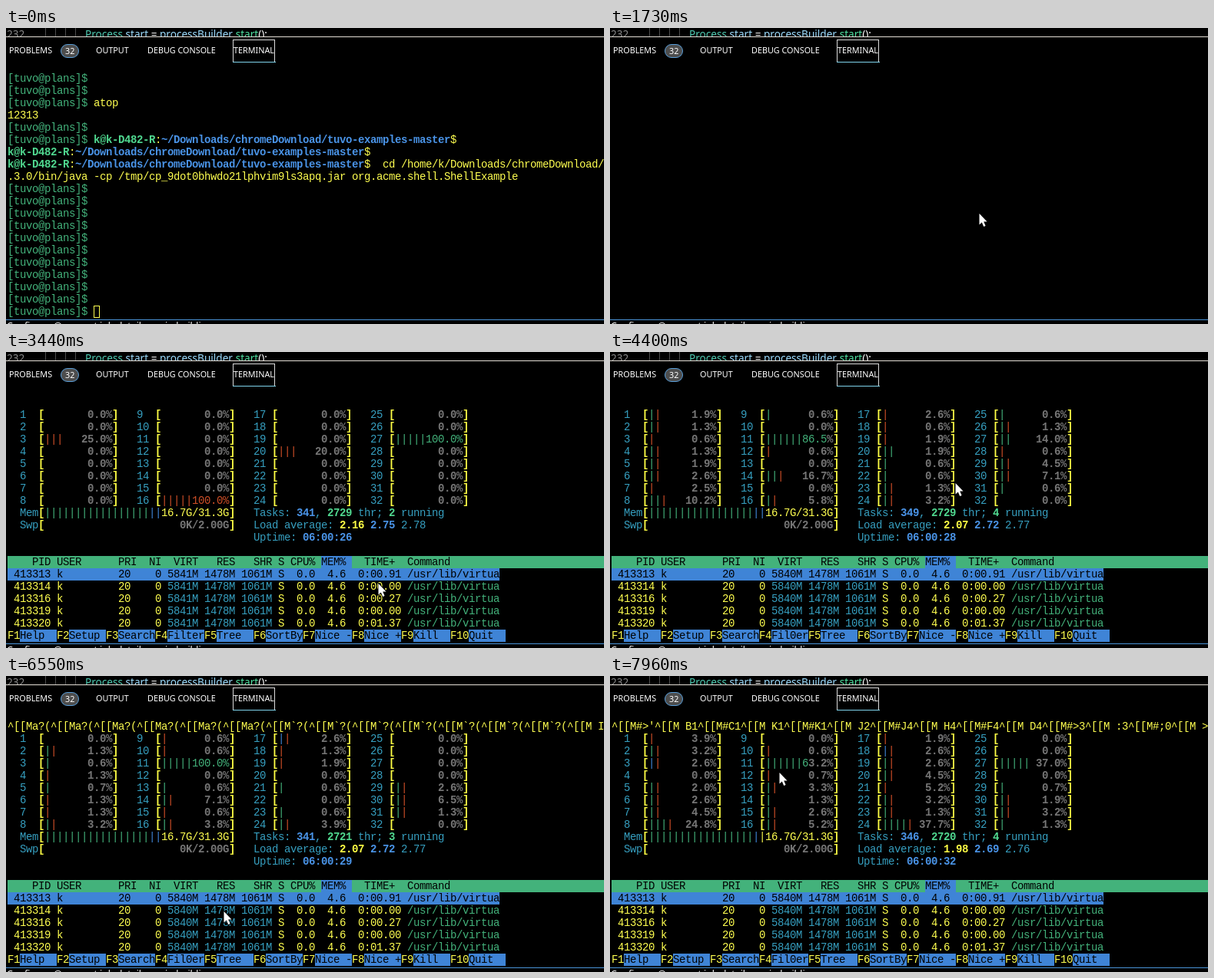
Animation, 778 px wide and 386 px high, one loop 8 s. Source, as an HTML page with a canvas:

```html
<!DOCTYPE html>
<html lang="en">
<head>
<meta charset="utf-8">
<title>Terminal session</title>
<style>
html, body { margin: 0; width: 100%; height: 100%; overflow: hidden; background: #000; }
canvas { display: block; }
</style>
</head>
<body>
<canvas id="stage" width="778" height="386"></canvas>
<script>
const LOOP = 8000, COLS = 97, CELL_W = 8, CELL_H = 16, LEFT = 2, TOP = 58;
const ctx = document.getElementById('stage').getContext('2d');
const MONO = '14px "Liberation Mono", monospace';
const UI = '"Noto Sans", sans-serif';

// Lower case is regular, upper case is bold.
const INK = {
  y: '#ffff50', Y: '#ffff45', g: '#43b27b', G: '#50d990',
  b: '#3f84d6', B: '#4a94e8', c: '#369fc0', r: '#cf4f27',
  K: '#767676', k: '#000'
};

const cellX = col => LEFT + col * CELL_W;
const cellY = row => TOP + row * CELL_H;

function fill(color, x, y, w, h) {
  ctx.fillStyle = color;
  ctx.fillRect(x, y, w, h);
}

function print(col, row, text, style = 'y', bg) {
  if (bg) fill(INK[bg], cellX(col), cellY(row), text.length * CELL_W, CELL_H);
  ctx.font = (style < 'a' ? 'bold ' : '') + MONO;
  ctx.fillStyle = INK[style];
  for (const ch of text) {
    if (ch !== ' ') ctx.fillText(ch, cellX(col), cellY(row) + 12);
    col++;
  }
  return col;
}

// Alternating text and style arguments, printed one after another.
function spans(col, row, ...parts) {
  for (let i = 0; i < parts.length; i += 2) col = print(col, row, parts[i], parts[i + 1]);
  return col;
}

function label(text, x, y, size, color = '#fff') {
  ctx.font = size + 'px ' + UI;
  ctx.fillStyle = color;
  ctx.fillText(text, x, y);
  return x + ctx.measureText(text).width;
}

// ---- Editor frame ----

function drawFrame() {
  ctx.save();
  ctx.beginPath();
  ctx.rect(0, 0, 778, 11);
  ctx.clip();
  label('232', 1, 12.5, 13.6, '#8a8a8a');
  for (let x = 51; x <= 90; x += 13) fill('#4c4c4c', x, 0, 1, 11);
  const code = [['Process', '#4ec9b0'], [' start', '#9cdcfe'], [' = ', '#fff'],
    ['processBuilder', '#9cdcfe'], ['.', '#fff'], ['start', '#4ee0a0'], ['();', '#fff']];
  let x = 103;
  for (const [text, color] of code) x = label(text, x, 12.5, 13.6, color);
  ctx.restore();

  fill('#e4ded6', 0, 11, 778, 1);
  label('PROBLEMS', 4, 33, 10.8);
  label('OUTPUT', 117, 33, 10.8);
  label('DEBUG CONSOLE', 184, 33, 10.8);
  label('TERMINAL', 296, 33, 10.8);

  ctx.beginPath();
  ctx.roundRect(71.5, 21.5, 23, 17, 8.5);
  ctx.fillStyle = '#4d4d4d';
  ctx.fill();
  ctx.lineWidth = 1;
  ctx.strokeStyle = '#5aa0dc';
  ctx.stroke();
  label('32', 77, 34, 10.8);

  ctx.strokeStyle = '#dcdcdc';
  ctx.strokeRect(295.5, 15.5, 54, 29);
  fill('#7fd4ec', 295, 44, 56, 1);

  fill('#4a94d8', 0, 380, 778, 1);
  label('Configure @ current job details, main building', 1, 393, 12.4);
}

// ---- Shell ----

const PROMPT = '[tuvo@plans]$ ';
const KEYS = [[780, 'h'], [1150, 't'], [1230, 'o'], [1310, 'p']];

function hostPrompt(col, row) {
  return spans(col, row, 'k@k-D482-R', 'G', ':', 'y',
    '~/Downloads/chromeDownload/tuvo-examples-master', 'B', '$', 'y');
}

function drawShell(t) {
  const shift = t >= 1690 ? 1 : 0;
  for (let line = shift; line < 20; line++) {
    const row = line - shift;
    if (line === 3) print(0, row, '12313');
    else if (line === 6) hostPrompt(0, row);
    else if (line === 7) print(hostPrompt(0, row), row, '  cd /home/k/Downloads/chromeDownload/');
    else if (line === 8) print(0, row, '.3.0/bin/java -cp /tmp/cp_9dot0bhwdo21lphvim9ls3apq.jar org.acme.shell.ShellExample');
    else {
      const col = print(0, row, PROMPT, 'g');
      if (line === 2) print(col, row, 'atop');
      if (line === 5) hostPrompt(col, row);
    }
  }
  const typed = KEYS.filter(k => t >= k[0]).map(k => k[1]).join('');
  const end = print(PROMPT.length, 19 - shift, typed);
  const x = cellX(shift ? 0 : end), y = cellY(19);
  if (t >= 650) fill(INK.y, x, y, CELL_W, CELL_H);
  else {
    ctx.strokeStyle = INK.y;
    ctx.strokeRect(x + .5, y + .5, CELL_W - 1, CELL_H - 1);
  }
}

// ---- Process monitor ----

// One word per core: load in percent, then bar colours (G, R: filled by load).
const cores = text => text.split(' ');
const SAMPLES = [
  { t: 2020, tasks: 341, threads: 2729, running: 2, load: ['2.16', '2.75', '2.78'], sec: 26, virt: '5841M',
    cores: cores('0 0 25rrr 0 0 0 0 0 0 0 0 0 0 0 0 100R 0 0 0 20rrr 0 0 0 0 0 0 100G 0 0 0 0 0') },
  { t: 3480, tasks: 349, threads: 2729, running: 4, load: ['2.07', '2.72', '2.77'], sec: 28,
    cores: cores('1.9gr 1.3gr .6r 1.3gr 1.9gr 2.6gr 2.5r 10.2ggr .6g 0 86.5G .6r 0 16.7ggr 0 5.8gr ' +
      '2.6r .6r 1.9r 1.9gg .6g .6g 1.3gr 3.2gr .6g 1.3gr 14gg .6r 4.5gr 7.1gr .6g 0') },
  { t: 4980, tasks: 341, threads: 2721, running: 3, load: ['2.07', '2.72', '2.77'], sec: 29,
    cores: cores('0 1.3gr .6g 1.3r .7g 1.3r 1.3r 3.2gr .6r .6r 100G 0 .6g 7.1gr .6r 3.8gr ' +
      '2.6br 1.3r 1.9r 0 .6g 0 .6g 3.9gr 0 0 0 0 2.6gr 6.5gr 1.3gr 0') },
  { t: 7960, tasks: 346, threads: 2720, running: 4, load: ['1.98', '2.69', '2.76'], sec: 32, mem: 'y',
    cores: cores('3.9r 3.2gr 2.6br 0 2.0gr 2.6gr 4.5gr 24.8gggr 0 .6r 63.2G .7r 3.3gr 1.3g 2.6gr 5.2gr ' +
      '1.9r 2.6br 2.6gr 4.5gr 5.2r 3.2gr 1.3gr 37.7ggggr 0 0 37ggggg 0 .7g 1.9gr 3.2gr 1.3g') }
];
// An in-between reading shares half its cores with each neighbour.
const [, , before, after] = SAMPLES;
SAMPLES.splice(3, 0, { ...after, t: 6590, sec: 31, running: 3, mem: 'b',
  cores: after.cores.map((c, i) => i % 2 ? c : before.cores[i]) });

function meter(col, row, bars, text, width) {
  print(col, row, '[', 'Y');
  const body = text.padStart(width);
  for (let i = 0; i < width; i++) {
    const ch = i < bars.length && body[i] === ' ' ? '|' : body[i];
    print(col + 1 + i, row, ch, bars[i] || 'K');
  }
  print(col + 1 + width, row, ']', 'Y');
}

function drawCores(list) {
  const columns = [2, 21, 40, 59];
  list.forEach((word, i) => {
    const load = parseFloat(word);
    let bars = word.replace(/[\d.]+/, '');
    if (/[GR]/.test(bars)) bars = bars.toLowerCase().repeat(Math.round(load * 11 / 100));
    const col = columns[i >> 3], row = 1 + i % 8;
    print(col, row, String(i + 1), 'c');
    meter(col + 3, row, bars, load.toFixed(1) + '%', 11);
  });
}

function drawSummary(s) {
  print(2, 9, 'Mem', 'c');
  meter(5, 9, 'g'.repeat(17) + 'b' + (s.mem || 'b') + 'y'.repeat(11), '16.7G/31.3G', 30);
  print(2, 10, 'Swp', 'c');
  meter(5, 10, '', '0K/2.00G', 30);
  spans(40, 9, 'Tasks: ', 'c', String(s.tasks), 'B', ', ', 'c', String(s.threads), 'G',
    ' thr; ', 'c', String(s.running), 'G', ' running', 'c');
  spans(40, 10, 'Load average: ', 'c', s.load[0] + ' ', 'Y', s.load[1] + ' ', 'B', s.load[2], 'c');
  spans(40, 11, 'Uptime: ', 'c', '06:00:' + s.sec, 'B');
}

const PROCESSES = [['413313', '0:00.91'], ['413314', '0:00.00'], ['413316', '0:00.27'],
  ['413319', '0:00.00'], ['413320', '0:01.37']];

function drawProcesses(virt) {
  print(0, 13, '    PID USER      PRI  NI  VIRT   RES   SHR S CPU% MEM%   TIME+  Command'.padEnd(COLS), 'k', 'g');
  print(51, 13, 'MEM% ', 'k', 'b');
  PROCESSES.forEach(([pid, time], i) => {
    const row = 14 + i, on = i === 0;
    if (on) fill(INK.b, LEFT, cellY(row), 640, CELL_H);
    const put = (col, text, style) => print(col, row, text, on ? 'k' : style);
    put(1, pid + ' k         20    0');
    put(26, virt + ' 1478M 1061M', 'c');
    put(44, 'S  0.0  4.6  ' + time);
    put(65, '/usr/lib/virtua', 'g');
  });
}

function drawKeys(stray) {
  const names = ['Help', 'Setup', 'Search', stray ? 'Fil0er' : 'Filter', 'Tree', 'SortBy',
    'Nice -', 'Nice +', 'Kill', 'Quit'];
  let col = 0;
  names.forEach((name, i) => {
    col = print(col, 19, 'F' + (i + 1));
    col = print(col, 19, name.padEnd(6), 'k', 'b');
  });
}

// ---- Mouse reports echoed on the first line ----

const SLOTS = 14;
const CODES = '?('.repeat(13) + 'I/' +
  'D0C2?494526.7*:(=(?)B,D.E0B*' +
  ">'B1C1K1K1J2J4H4F4D4>3:3;0>(";

function reportTime(i) {
  if (i < 13) return 5720 + i * 36;
  if (i === 13) return 6460;
  return i < 28 ? 6600 + (i - 14) * 41 : 7190 + (i - 28) * 57;
}

const reports = [];
for (let i = 0; i < CODES.length / 2; i++) {
  const code = CODES.substr(i * 2, 2);
  const button = i < 6 ? 'a' : i < 13 ? '`' : i % 2 ? ' ' : '#';
  reports.push({
    t: reportTime(i),
    text: '^[[M' + button + code,
    x: cellX(code.charCodeAt(0) - 33) + 4,
    y: cellY(code.charCodeAt(1) - 33) + 8
  });
}

function drawReports(t) {
  const line = [];
  reports.forEach((r, i) => { if (t >= r.t) line[i % SLOTS] = r.text; });
  print(0, 0, line.join('').slice(0, COLS));
}

// ---- Pointer ----

const TRACK = [
  [230, 650, 206], [450, 570, 226], [700, 480, 242], [2360, 480, 242], [2520, 463, 122],
  [2720, 463, 122], [2960, 420, 230], [3200, 455, 310], [3520, 493, 300], [3560, 494, 295],
  [4160, 494, 295], [4400, 449, 171], [5490, 449, 171],
  ...reports.map(r => [r.t, r.x, r.y]),
  [6240, 258, 257], [6350, 300, 275], [6550, 283, 307], [7960, 220, 126]
].sort((a, b) => a[0] - b[0]);

function drawPointer(t) {
  if (t < TRACK[0][0]) return;
  const next = TRACK.findIndex(k => k[0] > t);
  const b = TRACK[next < 0 ? TRACK.length - 1 : next];
  const a = next < 0 ? b : TRACK[next - 1];
  const p = a === b ? 0 : (t - a[0]) / (b[0] - a[0]);
  ctx.save();
  ctx.translate(Math.round(a[1] + (b[1] - a[1]) * p), Math.round(a[2] + (b[2] - a[2]) * p));
  const shape = new Path2D('M.5 0V14.5L3.8 11.5L6.2 17L8.6 16L6.2 10.6H10.5Z');
  ctx.lineWidth = 1.5;
  ctx.strokeStyle = '#000';
  ctx.stroke(shape);
  ctx.fillStyle = '#fff';
  ctx.fill(shape);
  ctx.restore();
}

function draw(t) {
  fill('#000', 0, 0, 778, 386);
  ctx.lineWidth = 1;
  drawFrame();
  if (t < 1730) drawShell(t);
  else if (t >= 2020) {
    const sample = SAMPLES.filter(s => t >= s.t).pop();
    drawCores(sample.cores);
    drawSummary(sample);
    drawProcesses(sample.virt || '5840M');
    drawKeys(t >= 3480);
    drawReports(t);
  }
  drawPointer(t);
}

const start = performance.now();
function tick() {
  draw((performance.now() - start) % LOOP);
  requestAnimationFrame(tick);
}
tick();
</script>
</body>
</html>
```
